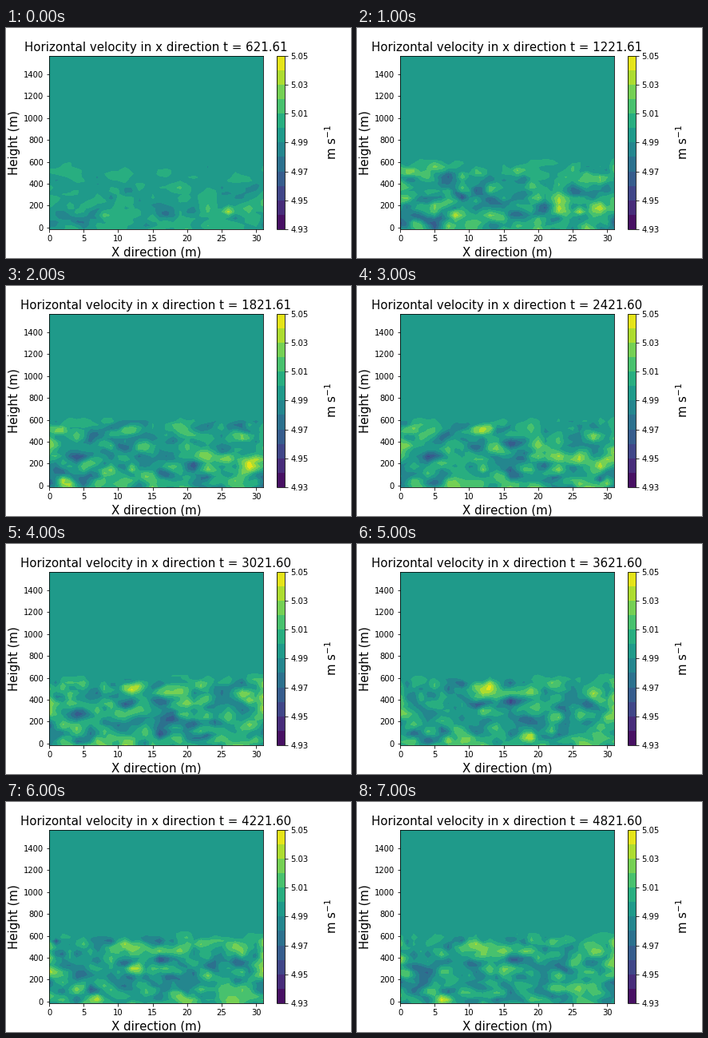
A matplotlib script for the animation above (8 s loop, 432x288 px).

```python
import numpy as np
import matplotlib.pyplot as plt
from matplotlib.animation import FuncAnimation

plt.rcParams["text.kerning_factor"] = 6

STEPS = 8
X = np.arange(32)
Z = np.linspace(-16, 1570, 51)
GX, GZ = np.meshgrid(X, Z)
LEVELS = np.linspace(4.93, 5.05, 13)
LID = 590

# Strong eddies: x, height, step of greatest strength, speed difference
EDDIES = [
    (26, 150, 0.5, 0.045), (8, 115, 1, 0.04), (2, 45, 2, 0.038),
    (30.4, 240, 2.4, 0.05), (12, 155, 2.5, 0.038), (29.3, 390, 4.3, 0.042),
    (19, 60, 5, 0.045), (6, 20, 7, 0.045), (9, 280, 1, -0.045),
    (16, 80, 3.8, -0.045), (29, 60, 3, -0.04), (1, 550, 6, -0.042),
]


def smooth_noise(rng):
    a = rng.standard_normal(GX.shape)
    for axis, w in ((0, 0.6), (1, 0.32)):
        a = a + w * (np.roll(a, 1, axis) + np.roll(a, -1, axis))
    return a / a.std()


def noise_series(keep=0.75):
    rng = np.random.default_rng(12)
    series = [smooth_noise(rng)]
    while len(series) < STEPS:
        fresh = smooth_noise(rng)
        series.append(keep * series[-1] + np.sqrt(1 - keep**2) * fresh)
    return series


def velocity(k):
    calm = np.exp(-3 * k)
    strength = 0.0135 * (1 - calm * (0.35 + 0.4 * np.clip(GZ / LID, 0, 1)))
    field = NOISE[k] * strength - 0.0015
    for x, z, peak, speed in EDDIES:
        life = np.exp(-((k - peak) / 1.1) ** 2)
        g = life * np.exp(-((GX - x) / 0.85) ** 2 - ((GZ - z) / 36) ** 2)
        field += (speed - field) * g
    mixed = (GZ < LID + 80) / (1 + np.exp((GZ - LID) / 13))
    return np.clip(4.9985 + field * mixed, 4.931, 5.049)


NOISE = noise_series()

fig = plt.figure(figsize=(6, 4), dpi=72, facecolor="white")
fig.subplots_adjust(left=0.125, right=0.9, bottom=0.125, top=0.88)
ax = fig.add_subplot()


def draw_field(k):
    for old in list(ax.collections):
        old.remove()
    filled = ax.contourf(X, Z, velocity(k), LEVELS, cmap="viridis")
    t = 621.609 + 599.9985 * k
    ax.set_title(f"Horizontal velocity in x direction t = {t:.2f}", fontsize=15)
    return filled


bar = fig.colorbar(draw_field(0), ax=ax, ticks=LEVELS[::2], format="%.2f")
bar.minorticks_off()
bar.set_label("m s$^{-1}$", fontsize=15, labelpad=20)
ax.set_xlabel("X direction (m)", fontsize=15)
ax.set_ylabel("Height (m)", fontsize=15)
ax.set_xlim(0, 31)
ax.set_ylim(Z[0], Z[-1])
ax.set_xticks(range(0, 31, 5))
ax.set_yticks(range(0, 1401, 200))


def update(k):
    draw_field(k)
    return []


anim = FuncAnimation(fig, update, frames=STEPS, interval=1000, repeat=True,
                     repeat_delay=0, blit=False)
plt.show()
```
